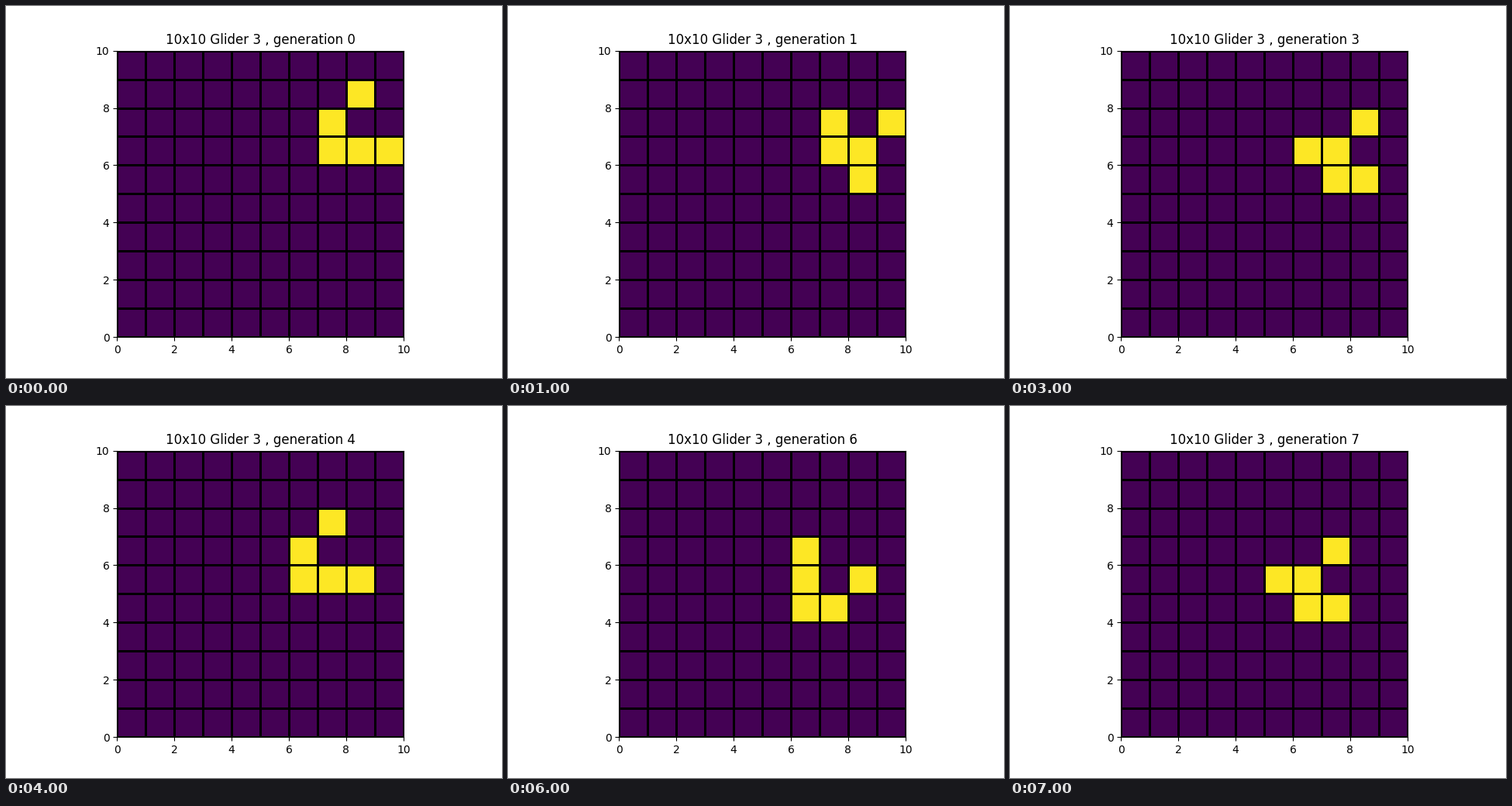
Animation of 640 by 480 pixels, one loop 8000 ms. Source, as a matplotlib script:

```python
import matplotlib.pyplot as plt
import numpy as np
from matplotlib.animation import FuncAnimation

SIZE = 10
GENERATIONS = 8
GLIDER = [(8, 8), (7, 7), (6, 7), (6, 8), (6, 9)]  # (row, column)


def evolve(grid):
    """Next generation under Conway's rules, with dead cells outside."""
    padded = np.pad(grid, 1)
    block = sum(padded[r:r + SIZE, c:c + SIZE]
                for r in range(3) for c in range(3))
    neighbours = block - grid
    return ((neighbours == 3) | ((grid == 1) & (neighbours == 2))).astype(int)


start = np.zeros((SIZE, SIZE), dtype=int)
for cell in GLIDER:
    start[cell] = 1

history = [start]
while len(history) < GENERATIONS:
    history.append(evolve(history[-1]))

plt.rcParams["text.kerning_factor"] = 6  # kern by whole pixels
fig, ax = plt.subplots(figsize=(6.4, 4.8), dpi=100)
mesh = ax.pcolormesh(start, cmap="viridis", vmin=0, vmax=1,
                     edgecolors="k", linewidth=2)
ax.set_aspect("equal")
ax.set_xticks(range(0, SIZE + 1, 2))
ax.set_yticks(range(0, SIZE + 1, 2))
title = ax.set_title("")


def update(generation):
    mesh.set_array(history[generation])
    title.set_text(f"{SIZE}x{SIZE} Glider 3 , generation {generation}")
    return mesh, title


anim = FuncAnimation(fig, update, frames=GENERATIONS, interval=1000,
                     repeat=True, repeat_delay=0, blit=False)
plt.show()
```
